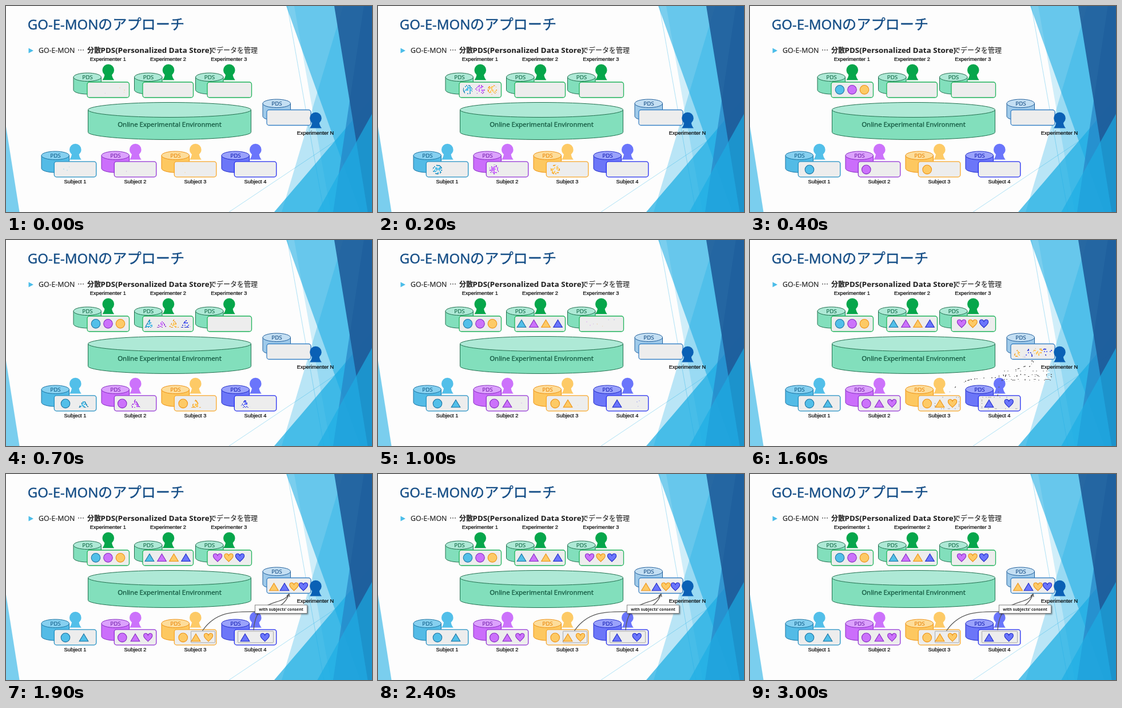
These frames come from a looping animation (640x360 px, 3100 ms). An HTML page:

```html
<!DOCTYPE html>
<html lang="ja">
<head>
<meta charset="utf-8">
<title>GO-E-MON</title>
<style>
html, body { margin: 0; width: 100%; height: 100%; overflow: hidden; background: #fdfdfd; }
svg { display: block; width: 640px; height: 360px; }
.jp { font-family: "Noto Sans CJK JP", "Noto Sans CJK", sans-serif; }
.latin { font-family: "Noto Sans", sans-serif; }
.label { font: 9.3px "Liberation Sans", Arial, sans-serif; text-anchor: middle; stroke: #000; stroke-width: .2px; }
.pds { font: 9.8px "Noto Sans", sans-serif; text-anchor: middle; stroke-width: .2px; }
</style>
</head>
<body>
<svg id="stage" viewBox="0 0 640 360" xmlns="http://www.w3.org/2000/svg">
  <defs>
    <filter id="shadow" x="-10%" y="-30%" width="125%" height="190%">
      <feDropShadow dx="1.5" dy="1.5" stdDeviation="1" flood-opacity=".45"/>
    </filter>
  </defs>
  <rect width="640" height="360" fill="#fdfdfd"/>
  <g id="facets">
    <path d="M492 0L556 360M640 193L390 360" stroke="#1cade4" stroke-opacity=".5" stroke-width=".7"/>
  </g>
  <text class="jp" y="41" font-size="25.2" fill="#174f87" stroke="#174f87" stroke-width=".4"><tspan class="latin" x="37.8" font-size="24">GO-E-MON</tspan><tspan x="161">のアプローチ</tspan></text>
  <path d="M39.5 73.5L48 78L39.5 82.5Z" fill="#4bbde9"/>
  <text class="jp" y="82" font-size="12" fill="#262626" stroke="#262626" stroke-width=".15">
    <tspan class="latin" x="57" font-size="12.3">GO-E-MON</tspan><tspan x="125">…</tspan><tspan x="142" font-weight="700">分散</tspan><tspan class="latin" x="165.6" font-size="13.2" letter-spacing=".12" font-weight="700">PDS(Personalized Data Store)</tspan><tspan x="356">でデータを管理</tspan>
  </text>
  <g id="scene"></g>
  <g id="data"></g>
</svg>
<script>
const NS = "http://www.w3.org/2000/svg";
const $ = id => document.getElementById(id);

function add(parent, tag, attrs, text) {
  const el = document.createElementNS(NS, tag);
  for (const k in attrs) el.setAttribute(k, attrs[k]);
  if (text) el.textContent = text;
  return parent.appendChild(el);
}

const scene = $("scene");

// Backdrop: points, colour, opacity
[
  ["589.4,0 640,0 640,360 482,360", "#1cade4", .3],
  ["504,0 640,0 640,360 567.6,360", "#1cade4", .2],
  ["469,360 640,160 640,360", "#1cade4", .72],
  ["490,0 640,0 640,360 619.6,360", "#1cade4", .58],
  ["625.6,0 640,0 640,360 572,360", "#2683c6", .7],
  ["574,0 640,0 640,360 632.5,360", "#1d5796", .85],
  ["544.4,360 640,188.4 640,360", "#1cade4", .66],
  ["0,210.7 23.6,360 0,360", "#1cade4", .58]
].forEach(([points, fill, o]) => add($("facets"), "polygon", { points, fill, "fill-opacity": o }));

const palette = {
  green:  { side: "#82dfbc", top: "#aee9d6", line: "#22704f", ink: "#1b6f4e", card: "#1fb45b", head: "#06a64b" },
  navy:   { side: "#9fcaea", top: "#c4dff3", line: "#22609c", ink: "#22578c", card: "#3a83c6", head: "#0a60b5" },
  blue:   { side: "#53bbe6", top: "#86d0f0", line: "#1b74a3", ink: "#17658f", card: "#2390c4", head: "#52bfe9" },
  purple: { side: "#cb6efb", top: "#dca2fd", line: "#862bc2", ink: "#7a28b0", card: "#9333d6", head: "#cc72fb" },
  orange: { side: "#fdc860", top: "#fddd9b", line: "#ee9213", ink: "#ea8a10", card: "#f9a828", head: "#fdca66" },
  indigo: { side: "#6c76f8", top: "#9aa2fb", line: "#202bc8", ink: "#1c26b8", card: "#222df0", head: "#6a75fb" }
};

function cylinder(x, y, w, h, ry, c) {
  const rx = w / 2, top = y + ry, end = y + h - ry;
  add(scene, "path", {
    d: `M${x} ${top}V${end}A${rx} ${ry} 0 0 0 ${x + w} ${end}V${top}Z`,
    fill: c.side, stroke: c.line
  });
  add(scene, "ellipse", { cx: x + rx, cy: top, rx, ry, fill: c.top, stroke: c.line });
}

function person(x, y, c) {
  add(scene, "path", {
    d: `M${x - 6} ${y + 5}Q${x - 6} ${y + 12} ${x - 10.5} ${y + 17.5}H${x + 10.5}Q${x + 6} ${y + 12} ${x + 6} ${y + 5}Z`,
    fill: c.head
  });
  add(scene, "circle", { cx: x, cy: y, r: 10.3, fill: c.head });
}

function card(x, y, w, c) {
  add(scene, "rect", { x, y, width: w, height: 27, rx: 4, fill: "#ededed", stroke: c.card, "stroke-width": 1.3 });
}

function store(x, y, cardX, cardY, cardW, headX, headY, color, name, nameX, nameY) {
  const c = palette[color];
  cylinder(x, y, 48.5, 37, 7.3, c);
  add(scene, "text", { class: "pds", x: x + 24.5, y: y + 11.3, fill: c.ink, stroke: c.ink }, "PDS");
  card(cardX, cardY, cardW, c);
  person(headX, headY, c);
  add(scene, "text", { class: "label", x: nameX, y: nameY }, name);
}

cylinder(143.5, 168.5, 285, 65, 13, palette.green);
add(scene, "text", {
  class: "latin", x: 286, y: 211, "font-size": 11.45, "text-anchor": "middle",
  fill: "#175c44", stroke: "#175c44", "stroke-width": .3
}, "Online Experimental Environment");

[[118, 142, 73.5, 178.8], [224.5, 239, 88.5, 284], [331.5, 352, 77.5, 390.3]].forEach(([x, cx, cw, hx], i) =>
  store(x, 117, cx, 133, cw, hx, 112, "green", "Experimenter " + (i + 1), hx - .5, 96));
store(449, 163, 456, 181.5, 77, 541.5, 196, "navy", "Experimenter N", 541, 225);
["blue", "purple", "orange", "indigo"].forEach((color, i) => {
  const x = 62 + i * 105;
  store(x, 254, x + 22.3, 271.8, 73.5, x + 59.3, 251, color, "Subject " + (i + 1), x + 59, 310);
});

const shapes = {
  circle: "M-7.8 0a7.8 7.8 0 1 1 15.6 0a7.8 7.8 0 1 1 -15.6 0Z",
  triangle: "M0 -6.5L7.8 6.5H-7.8Z",
  heart: "M0 7.2C-2 4.5 -7.6 1.5 -7.6 -2.8C-7.6 -7.6 -1.6 -8.2 0 -3.6C1.6 -8.2 7.6 -7.6 7.6 -2.8C7.6 1.5 2 4.5 0 7.2Z"
};

function mark(layer, shape, color, x, y) {
  const c = palette[color];
  add(layer, "path", {
    d: shapes[shape], transform: `translate(${x} ${y})`, fill: c.head, stroke: c.line, "stroke-width": 1.1
  });
}

// Each layer dissolves in from its start time, inside the given areas [x, y, width, height]
const bands = [[90, 136, 340, 20], [90, 276, 380, 20]];
function makeLayer(start, areas) {
  const id = "clip" + start;
  const clip = add(add($("stage"), "clipPath", { id }), "path", { "shape-rendering": "crispEdges" });
  return { start, areas, id, clip, g: add($("data"), "g", {}) };
}
const layers = [
  makeLayer(0, bands), makeLayer(500, bands), makeLayer(1000, bands),
  makeLayer(1500, [[320, 184, 220, 114]])
];
const [circles, triangles, hearts, consent] = layers.map(l => l.g);

[["blue", 157, 104], ["purple", 178.5, 203.3], ["orange", 200, 309.7]].forEach(([c, a, b]) => {
  mark(circles, "circle", c, a, 146.3);
  mark(circles, "circle", c, b, 285.8);
});
[["blue", 251, 136], ["purple", 272.5, 226], ["orange", 293.5, 332], ["indigo", 314.5, 418]].forEach(([c, a, b]) => {
  mark(triangles, "triangle", c, a, 146);
  mark(triangles, "triangle", c, b, 285.8);
});
[["purple", 370, 248.3], ["orange", 389.5, 354], ["indigo", 409, 452.7]].forEach(([c, a, b]) => {
  mark(hearts, "heart", c, a, 146);
  mark(hearts, "heart", c, b, 285.3);
});

mark(consent, "triangle", "orange", 468.5, 197.2);
mark(consent, "triangle", "indigo", 487, 197.2);
mark(consent, "heart", "orange", 503.5, 196.7);
mark(consent, "heart", "indigo", 520, 196.7);
[[323, 42], [405, 62]].forEach(([x, width]) => add(consent, "rect", {
  x: x + .5, y: 274.8, width, height: 20, rx: 1, fill: "none", stroke: "#444", "stroke-width": .8, "stroke-dasharray": "1 1"
}));
add(consent, "path", {
  d: "M343.5 274C372 232 415 243 450 240C475 238 490 225 495 209.5M433 273C436 214 484 232 495 209.5M490.8 213.2L495 209.5L496 214.8",
  fill: "none", stroke: "#595959", "stroke-width": 1.3
});
add(consent, "rect", {
  x: 435.5, y: 229, width: 91, height: 14.5, fill: "#fff", stroke: "#666", "stroke-width": .8, filter: "url(#shadow)"
});
add(consent, "text", {
  class: "latin", x: 481, y: 238.5, "font-size": 7, "font-weight": 700, "text-anchor": "middle", fill: "#222"
}, "with subjects’ consent");

function noise(x, y) {
  const n = Math.sin(x * 12.9898 + y * 78.233) * 43758.5453;
  return n - Math.floor(n);
}

function cells(areas, level) {
  let d = "";
  for (const [x0, y0, w, h] of areas)
    for (let y = y0; y < y0 + h; y += 2)
      for (let x = x0; x < x0 + w; x += 2)
        if (noise(x, y) < level) d += `M${x} ${y}h2v2h-2z`;
  return d;
}

const LOOP = 3100, STEP = 100;
const levels = [.03, .23, .47, .77];
let shown = -1;

function draw(step) {
  for (const { start, areas, id, clip, g } of layers) {
    const i = step - start / STEP;
    g.style.display = i < 0 ? "none" : "";
    g.style.opacity = i === 0 ? .25 : 1;
    if (i >= 0 && i < levels.length) {
      clip.setAttribute("d", cells(areas, levels[i]));
      g.setAttribute("clip-path", `url(#${id})`);
    } else g.removeAttribute("clip-path");
  }
}

const begin = performance.now();
function tick() {
  const step = Math.floor(((performance.now() - begin) % LOOP) / STEP);
  if (step !== shown) draw(shown = step);
  requestAnimationFrame(tick);
}
tick();
</script>
</body>
</html>
```
